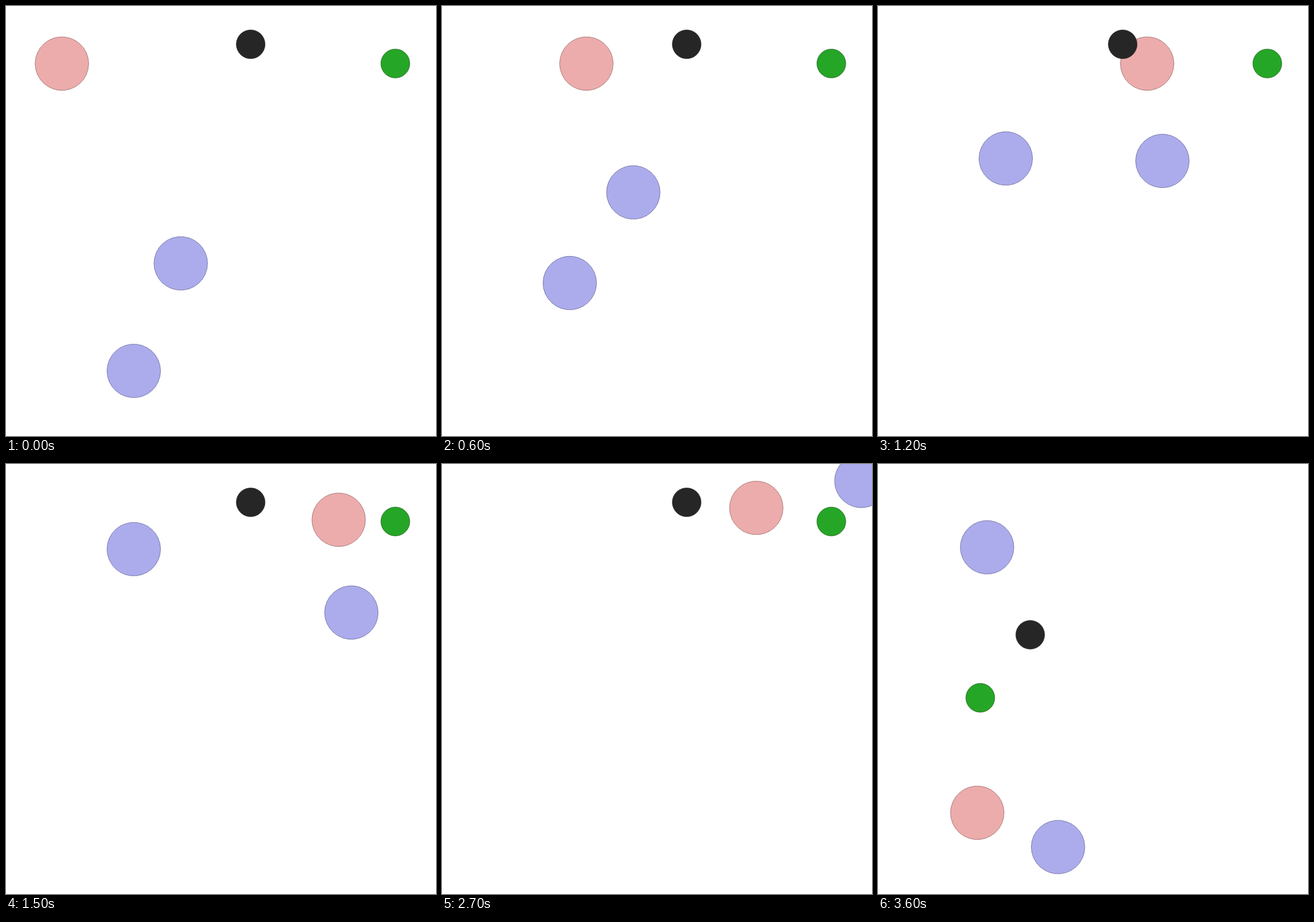
Write an HTML page with a canvas that moves like this. It is 700 by 700 pixels and loops after 3.75 s.

```html
<!DOCTYPE html>
<html lang="en">
<head>
<meta charset="utf-8">
<title>Pursuit</title>
<style>
  html, body { margin: 0; width: 100%; height: 100%; overflow: hidden; background: #fff; }
  canvas { display: block; }
</style>
</head>
<body>
<canvas id="stage" width="700" height="700"></canvas>
<script>
const ctx = document.getElementById('stage').getContext('2d');
const STEP = 150, LOOP = 3750, LAST = 24;
const DAMPING = 0.75, THRUST = 14.4;
const AGENT = 43.6, LANDMARK = 23.5, SIDES = 30;

const RED = { fill: '#ecacac', edge: 'rgba(108,45,45,.5)' };
const BLUE = { fill: '#acacec', edge: 'rgba(45,45,108,.5)' };
const BLACK = { fill: '#262626', edge: 'rgba(19,19,19,.5)' };
const GREEN = { fill: '#26a626', edge: 'rgba(19,83,19,.7)' };

// Each push is [steps, x acceleration, y acceleration]; afterwards the agent glides.
const agents = [
  { look: BLUE, x: 284.5, y: 419, vx: 0, vy: -13.5, pushes: [
    [2, 0.5, -THRUST], [1, 5.7, -8.7], [7, THRUST, 0], [1, 7.2, -8.2], [4, -0.6, -13.7],
    [1, -8.6, -7.7], [1, -8.6, 1.4], [3, 0, THRUST], [1, 0, 0], [2, 0, -13]] },
  { look: BLUE, x: 208, y: 594, vx: 0, vy: -15, pushes: [[12, 0, -THRUST]] },
  { look: RED, x: 91, y: 93.8, vx: 15.5, vy: 0, pushes: [
    [9, THRUST, 0], [1, 8.2, -3], [3, -0.8, -1.4], [7, -14.2, 0.3], [1, 7.5, 0], [2, THRUST, 1]] }
];

// Replays the damped motion of one agent from its start.
function positionAt({ x, y, vx, vy, pushes }, steps) {
  const forces = pushes.flatMap(([count, ax, ay]) => Array(count).fill([ax, ay]));
  for (let i = 0; i < steps; i++) {
    const [ax, ay] = forces[i] || [0, 0];
    vx = vx * DAMPING + ax;
    vy = vy * DAMPING + ay;
    x += vx;
    y += vy;
  }
  return [x, y];
}

function disc(look, radius, x, y) {
  ctx.beginPath();
  for (let i = 0; i < SIDES; i++) {
    const angle = 2 * Math.PI * i / SIDES;
    ctx.lineTo(x + radius * Math.cos(angle), y + radius * Math.sin(angle));
  }
  ctx.closePath();
  ctx.fillStyle = look.fill;
  ctx.fill();
  ctx.strokeStyle = look.edge;
  ctx.stroke();
}

function drawChase(step) {
  for (const agent of agents) disc(agent.look, AGENT, ...positionAt(agent, step));
  disc(BLACK, LANDMARK, 398.3, 62.3);
  disc(GREEN, LANDMARK, 633.8, 93.6);
}

// The last step shows the freshly scattered world.
function drawReset() {
  disc(BLUE, AGENT, 177.6, 135.6);
  disc(BLUE, AGENT, 293.1, 623.6);
  disc(RED, AGENT, 161.6, 567.8);
  disc(BLACK, LANDMARK, 247.8, 278);
  disc(GREEN, LANDMARK, 166.5, 380.6);
}

function render() {
  const step = Math.floor((performance.now() % LOOP) / STEP);
  ctx.clearRect(0, 0, 700, 700);
  if (step < LAST) drawChase(step);
  else drawReset();
  requestAnimationFrame(render);
}
render();
</script>
</body>
</html>
```
